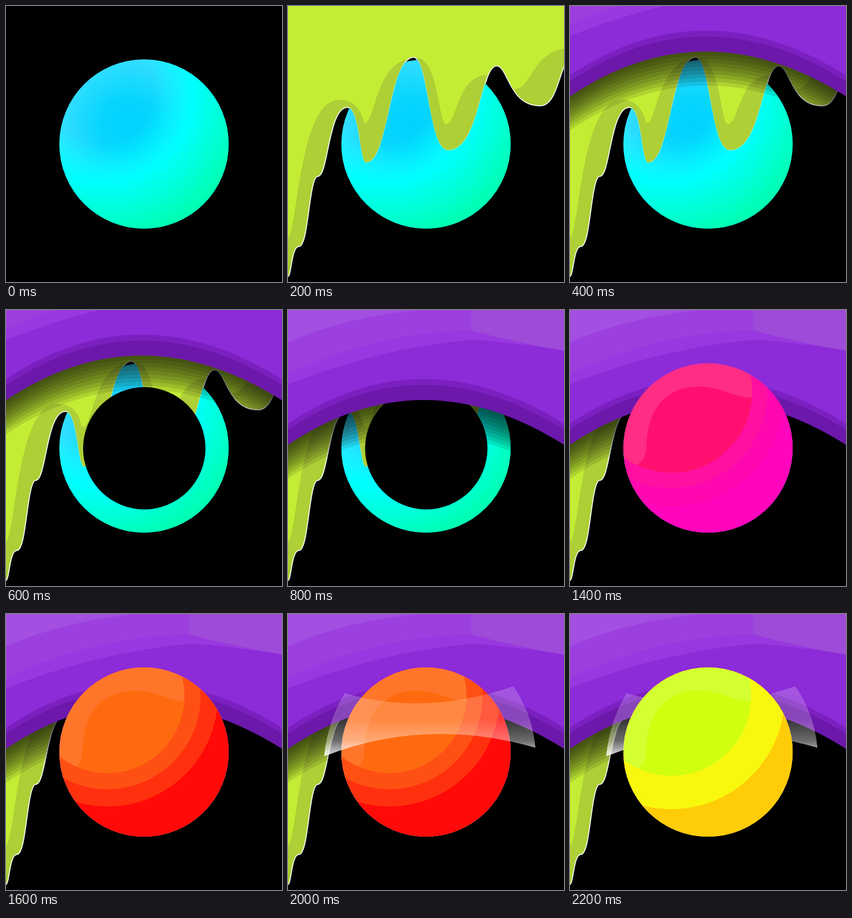
These frames come from a looping animation (512x512 px, 2400 ms). An HTML page with a canvas:

```html
<!DOCTYPE html>
<html lang="en">
<head>
<meta charset="utf-8">
<title>Drips and spheres</title>
<style>
html, body { margin: 0; width: 100%; height: 100%; overflow: hidden; background: #000; }
canvas { display: block; width: 100vw; height: 100vh; }
</style>
</head>
<body>
<canvas width="512" height="512"></canvas>
<script>
const ctx = document.querySelector('canvas').getContext('2d');
const STEP = 200, STEPS = 12;

// Flowing line through crests and drips, level at each one.
// The third value says how early the line turns down on its way to that point.
function flow(points) {
  const path = new Path2D();
  let [x, y] = points[0];
  path.moveTo(x, y);
  for (const [nx, ny, bend] of points.slice(1)) {
    const mid = x + (nx - x) * bend;
    path.bezierCurveTo(mid, y, mid, ny, nx, ny);
    [x, y] = [nx, ny];
  }
  return path;
}

function hanging(line) {
  const path = new Path2D(line);
  path.lineTo(-2, -2);
  path.lineTo(525, -2);
  path.closePath();
  return path;
}

const slimeEdge = flow([[525, 99], [468, 184, .4], [387, 110, .72], [297, 267, .35], [233, 94, .56],
  [145, 290, .53], [110, 187, .33], [55, 315, .66], [20, 445, .5], [-1, 501, .7]]);
const lightEdge = flow([[525, 78], [420, 154, .68], [370, 128, .1], [293, 219, .73], [238, 96, .25],
  [143, 217, .8], [95, 174, .1], [-2, 432, .79]]);
const slimeShape = hanging(slimeEdge), lightShape = hanging(lightEdge);

const coreShape = new Path2D('M95 288Q140 300 142 250C145 180 180 142 240 142C280 142 300 162 337 162L450 450H95Z');
const sash = new Path2D('M105 147Q256 190 418 134Q453 185 459 248Q256 190 67 264Q74 198 105 147Z');

const MAGENTA = { glow: '#ff2dff', core: '#f510ff', bands: [[156, '#cf0fff'], [185, '#a808ff'], [225, '#8f00ff']] };
const PINK = { glow: '#ff2d84', core: '#ff1070', bands: [[150, '#ff10a0'], [178, '#ff08b0'], [212, '#ff05bc']] };
const ORANGE = { glow: '#ff762a', core: '#ff6a10', bands: [[143, '#ff5014'], [173, '#ff300e'], [205, '#ff0a08']] };
const LIME = { glow: '#d4ff30', core: '#d0ff10', bands: [[148, '#f8f80e'], [210, '#ffcd08']] };

function fill(shape, color) {
  ctx.fillStyle = color;
  ctx.fill(shape);
}

function circle(r, x = 256, y = x) {
  const path = new Path2D();
  path.arc(x, y, r, 0, 7);
  return path;
}

function radial(x, y, r, stops) {
  const g = ctx.createRadialGradient(x, y, 0, x, y, r);
  for (const [d, color] of stops) g.addColorStop(d / r, color);
  return g;
}

const ballShape = circle(157);

function cyanBall() {
  fill(ballShape, radial(228, 222, 160, [[0, '#00d2ff'], [50, '#06d5ff'], [160, '#4ae2ff']]));
  fill(ballShape, radial(180, 160, 280, [[0, '#0ff0'], [95, '#0ff0'], [166, '#0ff'], [270, '#00ffb4']]));
}

function bandedBall({ glow, core, bands }) {
  const stops = [];
  let last = '#0000';
  for (const [r, color] of bands) {
    stops.push([r, last], [r, color]);
    last = color;
  }
  fill(ballShape, glow);
  ctx.save();
  ctx.clip(ballShape);
  fill(coreShape, core);
  ctx.restore();
  fill(ballShape, radial(188, 152, 300, stops));
}

function strokeEdge(width, color) {
  ctx.lineWidth = width;
  ctx.strokeStyle = color;
  ctx.stroke(slimeEdge);
}

function slime() {
  strokeEdge(1.5, '#c8e8a0');
  fill(slimeShape, '#aecf35');
  ctx.save();
  ctx.clip(slimeShape);
  fill(lightShape, '#c3ed35');
  ctx.restore();
}

// Everything above the dome's rim, with the rim raised by lift
function aboveRim(lift, color) {
  fill(new Path2D(`M0 ${250 - lift}Q248 ${84 - lift} 512 ${250 - lift}V-90H0Z`), color);
}

function dome(dy) {
  ctx.save();
  ctx.translate(0, dy);
  for (let drop = 7; drop <= 63; drop += 7) aboveRim(-drop, 'rgba(0,0,0,.11)');
  aboveRim(0, '#6c18aa');
  aboveRim(28, '#7b20c0');
  aboveRim(39, '#8c2bd8');
  fill(new Path2D('M0 138Q170 70 345 55Q430 62 512 75V0H0Z'), '#9838e0');
  fill(new Path2D('M0 118Q170 40 340 38Q430 62 512 75V0H0Z'), '#9b40df');
  fill(new Path2D('M0 60Q100 15 240 0H0Z'), '#a34fe2');
  fill(new Path2D('M340 0V38Q430 62 512 75V0Z'), '#9d4bd8');
  ctx.restore();
}

function drawSash() {
  const g = ctx.createLinearGradient(0, 195, 0, 262);
  g.addColorStop(0, 'rgba(255,255,255,.2)');
  g.addColorStop(.6, 'rgba(255,255,255,.42)');
  g.addColorStop(1, 'rgba(255,255,255,.85)');
  fill(sash, g);
}

// Layers pile up: each one appears at its step and stays until the loop ends
const LAYERS = [
  [1, () => strokeEdge(4, '#fff')],
  [0, cyanBall],
  [1, slime],
  [3, () => fill(circle(113.5, 256.5), '#000')],
  [2, step => dome(step > 3 ? 0 : -82.5)],
  [6, () => bandedBall(MAGENTA)],
  [7, () => bandedBall(PINK)],
  [8, () => bandedBall(ORANGE)],
  [9, drawSash],
  [11, () => bandedBall(LIME)]
];

const start = performance.now();
function tick() {
  const step = Math.floor((performance.now() - start) / STEP) % STEPS;
  ctx.clearRect(0, 0, 512, 512);
  for (const [from, paint] of LAYERS) if (step >= from) paint(step);
  requestAnimationFrame(tick);
}
tick();
</script>
</body>
</html>
```
